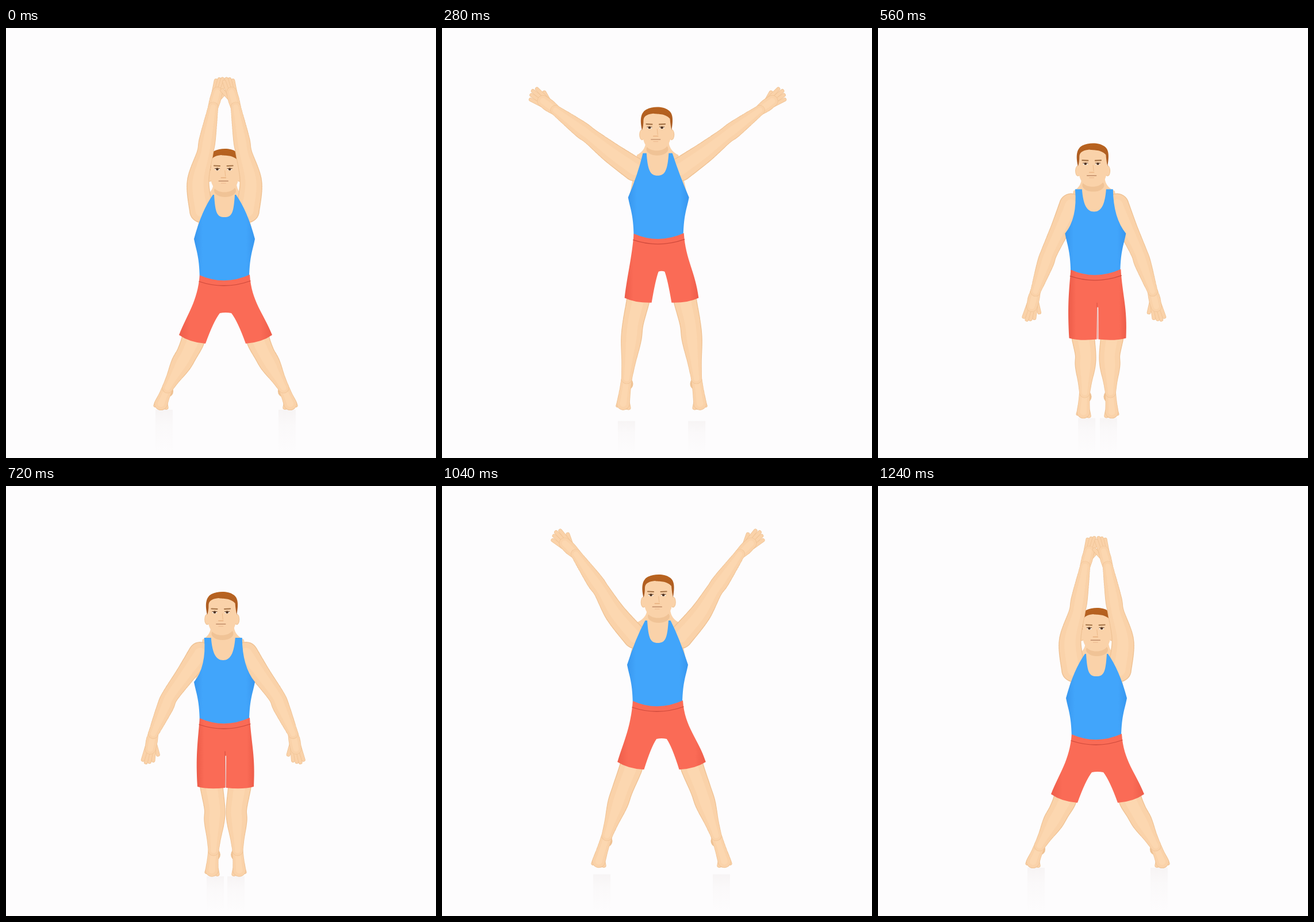
An HTML page with a canvas for the animation above (1280 ms loop, 748x748 px).

```html
<!DOCTYPE html>
<html lang="en">
<head>
<meta charset="utf-8">
<title>Jumping jack</title>
<style>
  html, body { margin: 0; width: 100%; height: 100%; overflow: hidden; background: #fdfcfd; }
  canvas { display: block; width: 100vw; height: 100vh; }
</style>
</head>
<body>
<canvas id="stage" width="748" height="748"></canvas>
<script>
const ctx = document.getElementById('stage').getContext('2d');
const LOOP = 1280, STEP = 40, LEG_CENTER = 382;
const SKIN = '#fad2a9', SKIN_EDGE = '#efc294', SKIN_LIGHT = '#fcd7b0';
const TIMES = [0, 160, 300, 400, 600, 720, 880, 1040, 1120, 1240];

// torso x, head x, waist y, leg spread
const BODY = [
  [380, 380, 438, 1], [378, 376.5, 390, .84], [376.5, 373, 364, .42], [375.5, 371, 377, .13], [379, 374, 436, 0],
  [380, 375.5, 412, 0], [375, 375, 356, .48], [375, 376, 382, .87], [377, 378, 417, .95], [380, 380, 440, 1]
];
// upper arm, forearm and hand angles: 0 is down, 90 outward, 180 up
const ARM = [
  [183.5, 190, 195.5], [168, 168, 172], [119, 119, 118], [80, 75, 73], [17, 11, 4],
  [35.6, 24, 11], [94, 88, 76], [144, 145, 134], [168, 171, 174], [183.5, 190, 195]
];
// knee, ankle and toe: distance from the middle, height on stage
const LEG = [
  [67, 566, 101, 626, 113, 655], [68, 532, 93, 608, 108, 654], [46, 512, 55, 611, 60, 656],
  [28, 532, 28, 622, 28, 661], [20, 572, 22, 636, 25, 671], [19, 560, 21, 634, 24, 670],
  [45, 502, 50, 602, 55, 652], [68, 528, 95, 608, 110, 655], [70, 552, 98, 620, 112, 655],
  [67, 566, 101, 626, 113, 655]
];

const clamp = (v, low, high) => Math.max(low, Math.min(high, v));
const clamp01 = v => clamp(v, 0, 1);
const mix = (a, b, k) => a + (b - a) * k;

// periodic cubic Hermite through the keys
function sample(track, t) {
  const n = TIMES.length;
  const wrap = i => (i + n) % n;
  const at = i => TIMES[wrap(i)] + LOOP * Math.floor(i / n);
  let i = n - 1;
  while (TIMES[i] > t) i--;
  const span = at(i + 1) - at(i), k = (t - at(i)) / span;
  return track[i].map((a, c) => {
    const val = j => track[wrap(j)][c];
    const slope = j => (val(j + 1) - val(j - 1)) / (at(j + 1) - at(j - 1)) * span;
    const b = val(i + 1), k2 = k * k, k3 = k2 * k;
    return a * (2 * k3 - 3 * k2 + 1) + slope(i) * (k3 - 2 * k2 + k)
      + b * (3 * k2 - 2 * k3) + slope(i + 1) * (k3 - k2);
  });
}

function catmull(p, q, r, s, k) {
  const cubic = 3 * (q - r) + s - p;
  const square = 2 * p - 5 * q + 4 * r - s;
  return q + .5 * k * (r - p + k * (square + k * cubic));
}

// soft tapered tube through [x, y, radius] points
function limb(points) {
  const spots = [], last = points.length - 1, STEPS = 14;
  for (let i = 0; i < last; i++) {
    const [p, q, r, s] = [-1, 0, 1, 2].map(d => points[clamp(i + d, 0, last)]);
    for (let j = 0; j <= STEPS; j++) {
      spots.push(q.map((v, c) => catmull(p[c], v, r[c], s[c], j / STEPS)));
    }
  }
  for (const [scale, color] of [[1, SKIN_EDGE], [.93, SKIN], [.5, SKIN_LIGHT]]) {
    ctx.fillStyle = color;
    ctx.beginPath();
    for (const [x, y, r] of spots) {
      ctx.moveTo(x + r * scale, y);
      ctx.arc(x, y, r * scale, 0, 7);
    }
    ctx.fill();
  }
}

function line(x1, y1, x2, y2, width, color) {
  ctx.lineCap = 'round';
  ctx.lineWidth = width;
  ctx.strokeStyle = color;
  ctx.beginPath();
  ctx.moveTo(x1, y1);
  ctx.lineTo(x2, y2);
  ctx.stroke();
}

function digit(x1, y1, x2, y2, width) {
  line(x1, y1, x2, y2, width, SKIN_EDGE);
  line(x1, y1, x2, y2, width - 1.5, SKIN);
}

function oval(x, y, rx, ry, color) {
  ctx.fillStyle = color;
  ctx.beginPath();
  ctx.ellipse(x, y, rx, ry, 0, 0, 7);
  ctx.fill();
}

function drawHand(x, y, angle, side) {
  const dx = side * Math.sin(angle), dy = Math.cos(angle);
  const nx = side * dy, ny = -side * dx;
  const at = (along, across) => [x + dx * along + nx * across, y + dy * along + ny * across];
  const open = clamp01(.35 + .4 * Math.sin(angle));
  const inward = clamp(-dy * 1.5, -1, 1);
  digit(...at(16, inward * 6), ...at(34, inward * 15), 7);
  for (let i = 0; i < 4; i++) {
    const o = i - 1.5;
    digit(...at(24, o * (3.6 + 1.8 * open)), ...at(52 - Math.abs(o - .3) * 3.5, o * (4 + 4.6 * open)), 6.8);
  }
  limb([[x, y, 9], [...at(14, 0), 9.5 + 2 * open], [...at(27, 0), 8.5 + 2.5 * open]]);
}

function drawArm(center, waist, [upper, fore, hand], side) {
  const rad = Math.PI / 180;
  const lift = clamp01((upper - 90) / 75);
  const move = ([x, y], a, length) => [x + side * Math.sin(a * rad) * length, y + Math.cos(a * rad) * length];
  const shoulder = [center + side * 40, waist - 120];
  const elbow = move(shoulder, upper, 90 + 10 * lift);
  const wrist = move(elbow, fore, 72 + 10 * lift);
  const bow = 9 * lift * lift;
  const bicep = [mix(shoulder[0], elbow[0], .5) + side * bow, mix(shoulder[1], elbow[1], .5)];
  const muscle = [mix(elbow[0], wrist[0], .3), mix(elbow[1], wrist[1], .3)];
  drawHand(...wrist, hand * rad, side);
  limb([[...shoulder, 21], [...bicep, 17 + 2.5 * lift], [...elbow, 14.5], [...muscle, 14.5], [...wrist, 9]]);
}

function drawLeg(waist, spread, [kx, ky, ax, ay, tx, ty], side) {
  const X = d => LEG_CENTER + side * d;
  const shin = (k, r) => [X(mix(kx, ax, k)), mix(ky, ay, k), r];
  const foot = (k, r) => [X(mix(ax, tx, k)), mix(ay, ty, k), r];
  const [hx, hy] = foot(.2, 0);
  oval(hx - side * 4, hy, 8.5, 10, SKIN_EDGE);
  for (let i = 0; i < 5; i++) {
    const o = i - 2;
    digit(X(tx + o * 4), ty - 3, X(tx + o * 4.8), ty + 6 - Math.max(0, o) * 1.6 - Math.abs(o) * .5, i ? 6 : 8);
  }
  limb([foot(0, 9.5), foot(.45, 10), foot(.95, 11.5)]);
  limb([[X(24 + 30 * spread), waist + 88, 21], [X(25 + 32 * spread), waist + 106, 20.5],
    shin(0, 18.5), shin(.3, 18), shin(.7, 12.5), shin(1, 9.5)]);
}

function drawReflection(waist, leg, side) {
  const x = LEG_CENTER + side * leg[4];
  const top = Math.max(leg[5] + 9, 664 + Math.max(0, 405 - waist) * .5);
  const fade = ctx.createLinearGradient(0, top, 0, 742);
  fade.addColorStop(0, 'rgba(150,120,110,.06)');
  fade.addColorStop(.35, 'rgba(150,120,110,.025)');
  fade.addColorStop(1, 'rgba(150,120,110,0)');
  ctx.fillStyle = fade;
  ctx.fillRect(x - 15 - side * 6, top, 30, 742 - top);
}

function drawTrunk(center, cx, hx, waist) {
  ctx.fillStyle = SKIN;
  ctx.beginPath();
  ctx.moveTo(hx - 19, waist - 172);
  ctx.quadraticCurveTo(hx - 18, waist - 153, center - 36, waist - 145);
  ctx.lineTo(cx - 51, waist - 70);
  ctx.lineTo(cx + 51, waist - 70);
  ctx.lineTo(center + 36, waist - 145);
  ctx.quadraticCurveTo(hx + 20, waist - 153, hx + 21, waist - 172);
  ctx.fill();
}

function drawHead(hx, top) {
  ctx.save();
  ctx.translate(hx, top);
  oval(1, 73, 19, 11, '#f0c396');
  for (const x of [-25.5, 26]) {
    oval(x, 48, 4.8, 9.5, SKIN_EDGE);
    oval(x, 48, 3.8, 8.5, SKIN);
  }
  ctx.fillStyle = SKIN;
  ctx.beginPath();
  ctx.moveTo(-25, 20);
  ctx.bezierCurveTo(-26, 44, -25, 58, -18, 68);
  ctx.bezierCurveTo(-11, 78, 11, 78, 18, 68);
  ctx.bezierCurveTo(26, 58, 26, 44, 25, 20);
  ctx.bezierCurveTo(20, 2, -20, 2, -25, 20);
  ctx.fill();

  const hair = ctx.createLinearGradient(0, 0, 0, 38);
  hair.addColorStop(0, '#b9631f');
  hair.addColorStop(1, '#a75a24');
  ctx.fillStyle = hair;
  ctx.beginPath();
  ctx.moveTo(-25.5, 40);
  ctx.bezierCurveTo(-29, 24, -29, 10, -18, 4);
  ctx.bezierCurveTo(-6, -2, 12, -1, 20, 5);
  ctx.bezierCurveTo(30, 11, 28, 26, 26, 40);
  ctx.quadraticCurveTo(24, 32, 23, 20);
  ctx.bezierCurveTo(14, 10, 2, 13, -6, 11);
  ctx.bezierCurveTo(-14, 12, -22, 14, -23, 22);
  ctx.quadraticCurveTo(-23, 34, -25.5, 40);
  ctx.fill();

  ctx.translate(-1.7, 0);
  for (const side of [-1, 1]) {
    const x = side * 10.8;
    line(x - side * 4.5, 30, x + side * 5.5, 29.5, 2.2, '#a57448');
    oval(x, 35.7, 4.2, 2.2, '#f8eee4');
    oval(x, 35.5, 2.3, 2.2, '#4a3020');
    line(x - 4.2, 34.4, x + 4.2, 34.4, 1, '#70482c');
  }
  line(2.5, 38, 3.5, 48, 1, '#edba89');
  line(-4, 50.5, 4, 50.5, 1.4, '#e7ae7c');
  line(-8, 56.2, 8, 56.2, 1.4, '#c08b68');
  line(-4, 60, 4, 60, 1, '#ecb78d');
  ctx.restore();
}

function drawShirt(center, cx, waist, raise) {
  const u = Math.min(1, raise * 1.4), outer = 33 - 13 * u, inner = 21 - 3 * u;
  const top = waist - 148, low = waist - 109;
  const blue = ctx.createLinearGradient(cx - 54, 0, cx + 54, 0);
  blue.addColorStop(0, '#3896ee');
  blue.addColorStop(.15, '#41a5fb');
  blue.addColorStop(.85, '#41a5fb');
  blue.addColorStop(1, '#3896ee');
  ctx.fillStyle = blue;
  ctx.beginPath();
  ctx.moveTo(center - outer, top);
  ctx.quadraticCurveTo(cx - 31 - 9 * u, waist - 98 - 22 * u, cx - 53, waist - 71);
  ctx.bezierCurveTo(cx - 49, waist - 50, cx - 43, waist - 40, cx - 43, waist + 4);
  ctx.lineTo(cx + 43, waist + 4);
  ctx.bezierCurveTo(cx + 43, waist - 40, cx + 49, waist - 50, cx + 53, waist - 71);
  ctx.quadraticCurveTo(cx + 31 + 9 * u, waist - 98 - 22 * u, center + outer, top);
  ctx.lineTo(center + inner, top);
  ctx.bezierCurveTo(center + inner - 2, waist - 122 + 6 * u, center + 13, low, center, low);
  ctx.bezierCurveTo(center - 13, low, center - inner + 2, waist - 122 + 6 * u, center - inner, top);
  ctx.closePath();
  ctx.fill();
}

function drawShorts(cx, waist, spread) {
  const L = d => LEG_CENTER - d, R = d => LEG_CENTER + d;
  const outer = 49 + 32 * spread, inner = 1 + 34 * spread, gap = 1 + 9 * spread;
  const outerY = waist + 111 - 15 * spread, innerY = waist + 113 - 2 * spread;
  const hip = 52 + 14 * spread, bend = 1 + 20 * spread;
  const red = ctx.createLinearGradient(L(outer), 0, R(outer), 0);
  red.addColorStop(0, '#ee5d4a');
  red.addColorStop(.12, '#fa6b56');
  red.addColorStop(.88, '#fa6b56');
  red.addColorStop(1, '#ee5d4a');
  ctx.fillStyle = red;
  ctx.beginPath();
  ctx.moveTo(cx - 43, waist - 8);
  ctx.bezierCurveTo(cx - 47, waist + 38, L(hip), waist + 58, L(outer), outerY);
  ctx.quadraticCurveTo(L(mix(outer, inner, .4)), mix(outerY, innerY, .6) + 4, L(inner), innerY);
  ctx.quadraticCurveTo(L(bend), waist + 72, L(gap), waist + 58);
  ctx.quadraticCurveTo(LEG_CENTER, waist + 56, R(gap), waist + 58);
  ctx.quadraticCurveTo(R(bend), waist + 72, R(inner), innerY);
  ctx.quadraticCurveTo(R(mix(outer, inner, .4)), mix(outerY, innerY, .6) + 4, R(outer), outerY);
  ctx.bezierCurveTo(R(hip), waist + 58, cx + 47, waist + 38, cx + 44, waist - 9);
  ctx.quadraticCurveTo(cx, waist + 11, cx - 43, waist - 8);
  ctx.fill();

  ctx.strokeStyle = '#cf4a3c';
  ctx.lineWidth = 1.3;
  ctx.beginPath();
  ctx.moveTo(cx - 44, waist + 3);
  ctx.quadraticCurveTo(cx, waist + 18, cx + 45, waist + 2);
  ctx.stroke();

  ctx.globalAlpha = clamp01(1 - spread * 8) * .6;
  line(LEG_CENTER - 1, waist + 50, LEG_CENTER, innerY - 1, 1.5, '#cf4a3c');
  ctx.globalAlpha = 1;
}

function draw(t) {
  const [cx, hx, waist, rawSpread] = sample(BODY, t);
  const arm = sample(ARM, t), leg = sample(LEG, t);
  const spread = clamp01(rawSpread), center = (cx + hx) / 2;
  const sides = [-1, 1];
  ctx.fillStyle = '#fdfcfd';
  ctx.fillRect(0, 0, 748, 748);
  sides.forEach(side => drawReflection(waist, leg, side));
  sides.forEach(side => drawLeg(waist, spread, leg, side));
  drawTrunk(center, cx, hx, waist);
  drawHead(hx, waist - 228);
  sides.forEach(side => drawArm(center, waist, arm, side));
  drawShirt(center, cx, waist, clamp01((arm[0] - 90) / 90));
  drawShorts(cx, waist, spread);
}

const start = performance.now();
function tick() {
  const t = Math.max(0, performance.now() - start) % LOOP;
  draw(Math.floor(t / STEP) * STEP);
  requestAnimationFrame(tick);
}
tick();
</script>
</body>
</html>
```
